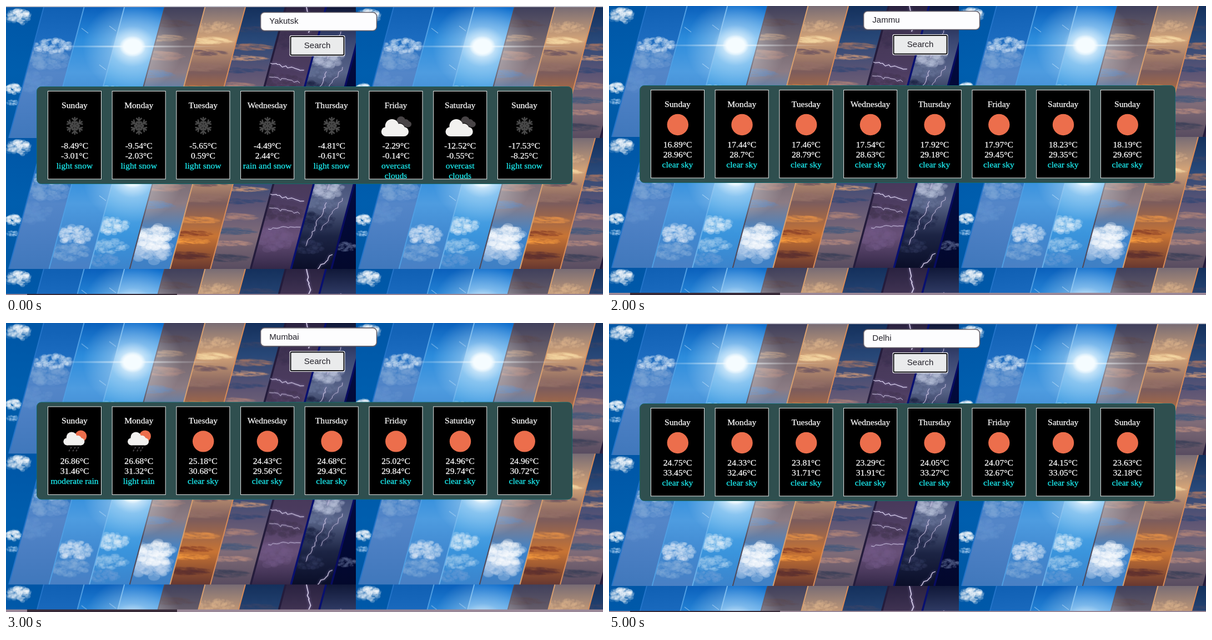
Write an HTML page with a canvas that moves like this. It is 1075 px wide and 521 px high and loops after 6 s.

```html
<!DOCTYPE html>
<html lang="en">
<head>
<meta charset="utf-8">
<title>Weather forecast</title>
<style>
html, body { margin: 0; width: 100%; height: 100%; overflow: hidden; background: #9a8898; }
#stage { position: absolute; left: 0; top: 0; width: 1075px; height: 526px; }
#stage > * { position: absolute; left: 0; top: 0; }
text { font: 15.6px "Liberation Serif", Times, serif; text-anchor: middle; fill: #fff; stroke: #fff; stroke-width: .25px; }
.sky { fill: #1cf0f4; stroke: #1cf0f4; }
.ui { font: 15px "Liberation Sans", Arial, sans-serif; text-anchor: start; fill: #222028; stroke: none; }
</style>
</head>
<body>
<div id="stage">
  <canvas id="back" width="1075" height="526"></canvas>
  <svg id="front" width="1075" height="526"></svg>
</div>
<script>
const W = 630, H = 236;
const days = 'Sunday Monday Tuesday Wednesday Thursday Friday Saturday Sunday'.split(' ');
const skies = {
  S: 'light snow', X: 'rain and snow', O: 'overcast/clouds', L: 'light rain', M: 'moderate rain',
  C: 'clear sky', B: 'broken clouds', F: 'few clouds', K: 'scattered/clouds'
};
// city, vertical scroll, sky codes, lows, highs
const cities = [
  ['Yakutsk', 0, 'SSSXSOOS', '-8.49 -9.54 -5.65 -4.49 -4.81 -2.29 -12.52 -17.53', '-3.01 -2.03 0.59 2.44 -0.61 -0.14 -0.55 -8.25'],
  ['Srinagar', 0, 'LCCCLCCC', '6.28 7.42 8.47 9.19 9.65 9.09 9.72 9.71', '16.87 19.66 20.52 20.99 20.14 20.75 20.99 21.05'],
  ['Jammu', -2, 'CCCCCCCC', '16.89 17.44 17.46 17.54 17.92 17.97 18.23 18.19', '28.96 28.7 28.79 28.63 29.18 29.45 29.35 29.69'],
  ['Mumbai', -2.6, 'MLCCCCCC', '26.86 26.68 25.18 24.43 24.68 25.02 24.96 24.96', '31.46 31.32 30.68 29.56 29.43 29.84 29.74 30.72'],
  ['Bengaluru', 0, 'LBFKKFLL', '18.78 18.12 17.16 16.62 15.68 16 16.69 17.62', '25.82 26.22 26 25.01 25.33 25.85 26.51 26.89'],
  ['Delhi', 0, 'CCCCCCCC', '24.75 24.33 23.81 23.29 24.05 24.07 24.15 23.63', '33.45 32.46 31.71 31.91 33.27 32.67 33.05 32.18']
];

let seed = 7;
const rnd = () => (seed = seed * 16807 % 2147483647) / 2147483647;
const edge = (k, y) => 68 + 72.6 * k - .267 * y;

// Each stripe: vertical gradient, then cloud patches "x y w h colour"
const stripes = [
  ['#0056a6 #005eae #0058a4', '22 18 42 26 #fff', '14 147 26 18 #fff', '38 152 18 14 #dcecfa', '12 172 22 10 #9cc4ea'],
  ['#1060b4 #1c6cc0 #5486c8 #4a7ec2 #4078bc', '72 92 88 40 #7ca4d4', '84 70 66 26 #e4eef8', '50 135 60 34 #6090cc'],
  ['#0a60bc #2c8cdc #4e9ce0 #4088d0 #4a80c4', '112 205 74 30 #84acd8', '124 174 60 32 #e0eaf6'],
  ['#0c6ccc #64b4f0 #52a8e8 #3a94dc #3c84cc', '186 194 62 26 #a8cdec', '192 158 54 30 #e0eef8', '172 220 60 22 #6c9cd4'],
  ['#40405c #70646c #8c7c84 #3c84cc #4080c4', '296 30 80 12 #5c4c54', '282 56 80 12 #b0907c', '276 88 80 16 #a8847c', '262 120 74 14 #6488b8', '262 198 70 52 #c0d4ec', '268 180 64 44 #fff'],
  ['#786c74 #d4a478 #7c5c5c #c87434 #683830', '376 36 78 20 #dcb48c', '364 60 76 12 #f4d8a4', '356 82 80 10 #6c5460', '346 108 84 14 #947068', '338 148 84 12 #e89448', '332 172 84 10 #843c28', '328 186 84 10 #fca040', '322 212 80 14 #5c3030'],
  ['#14305c #284878 #5c5474 #806c78 #584c60', '446 40 80 10 #384468', '438 72 80 12 #a47464', '430 92 76 9 #d49c78', '422 114 80 10 #344874', '408 142 84 12 #b08478', '404 168 84 12 #40587c', '398 190 84 10 #c09080', '390 216 84 14 #3c4058'],
  ['#2a2240 #463858 #4c3c60 #685078 #342848', '510 60 80 30 #3c3050', '494 136 80 30 #40344e', '482 182 66 40 #705884'],
  ['#101838 #384470 #586488 #1c2444 #0a0e28', '578 90 60 36 #b8c0d8', '566 118 60 20 #687498', '556 150 72 30 #1a2140', '540 196 62 24 #30385c'],
  ['#04104c #020a3c #03082c', '612 196 36 16 #5c6890']
];
const rims = '#2474c8 #509ee2 #68b0ea #504858 #d8a070 #d88c58 #241c3c #081070 #080c60'.split(' ');

function puff(c, [x, y, w, h, color]) {
  const flat = w > 4 * h;
  c.fillStyle = color;
  for (let i = 0; i < 110; i++) {
    const a = rnd() * 2 * Math.PI, d = Math.sqrt(rnd()) / 2, r = h * (.05 + .11 * rnd());
    c.globalAlpha = .1 + .22 * rnd();
    c.beginPath();
    c.ellipse(+x + w * d * Math.cos(a), +y + h * d * Math.sin(a), r * (flat ? 6 : 1.5), r, flat ? .1 : 0, 0, 7);
    c.fill();
  }
  c.globalAlpha = 1;
}

function bolt(c, x, y, toX, toY, width) {
  const n = Math.ceil(Math.hypot(toX - x, toY - y) / 5);
  c.beginPath();
  c.moveTo(x, y);
  for (let i = 1; i <= n; i++)
    c.lineTo(x + (toX - x) * i / n + (rnd() - .5) * 5, y + (toY - y) * i / n + (rnd() - .5) * 5);
  c.strokeStyle = '#d8d0ec';
  c.lineWidth = width;
  c.shadowColor = '#9080b8';
  c.shadowBlur = 4;
  c.stroke();
  c.shadowBlur = 0;
}

function makeTile() {
  const tile = document.createElement('canvas');
  tile.width = W;
  tile.height = H;
  const c = tile.getContext('2d');
  stripes.forEach(([colors, ...patches], k) => {
    const left = k ? edge(k - 1, 0) : -10, right = k < 9 ? edge(k, 0) : 720, lean = .267 * H;
    c.save();
    c.beginPath();
    c.moveTo(left, 0);
    c.lineTo(right, 0);
    c.lineTo(right - lean, H);
    c.lineTo(left - lean, H);
    c.clip();
    const g = c.createLinearGradient(0, 0, 0, H);
    colors.split(' ').forEach((s, i, all) => g.addColorStop(i / (all.length - 1), s));
    c.fillStyle = g;
    c.fillRect(0, 0, W, H);
    patches.forEach(p => puff(c, p.split(' ')));
    c.restore();
  });
  rims.forEach((color, k) => {
    c.strokeStyle = color;
    c.lineWidth = k > 5 ? 3.5 : 2;
    c.beginPath();
    c.moveTo(edge(k, 0), 0);
    c.lineTo(edge(k, H), H);
    c.stroke();
  });
  const glow = (rx, ry, stops) => {
    c.save();
    c.translate(228, 71);
    c.scale(rx, ry);
    const g = c.createRadialGradient(0, 0, 0, 0, 0, 1);
    stops.forEach(([at, a]) => g.addColorStop(at, `rgba(245,252,255,${a})`));
    c.fillStyle = g;
    c.fillRect(-1, -1, 2, 2);
    c.restore();
  };
  glow(90, 82, [[0, .95], [.2, .75], [.45, .32], [1, 0]]);
  glow(24, 19, [[0, 1], [.65, 1], [1, 0]]);
  glow(165, 2.5, [[0, .8], [.5, .3], [1, 0]]);
  c.strokeStyle = 'rgba(220,240,255,.45)';
  c.lineWidth = 1.2;
  c.beginPath();
  for (const [x, y] of [[136, 38], [186, 34], [168, 104]]) {
    c.moveTo(x, y);
    c.lineTo(x + 12, y + 9);
  }
  c.stroke();
  bolt(c, 476, 101, 536, 114, 1.2);
  bolt(c, 474, 126, 528, 136, .9);
  bolt(c, 472, 164, 528, 160, .9);
  bolt(c, 541, 0, 547, 44, 1.7);
  bolt(c, 603, 44, 580, 92, .9);
  bolt(c, 577, 116, 540, 196, 1);
  bolt(c, 606, 108, 566, 168, .8);
  bolt(c, 588, 210, 562, 235, 1.3);
  return tile;
}

function paintBack() {
  const c = document.getElementById('back').getContext('2d');
  const tile = makeTile();
  for (let y = 2; y < 526; y += H)
    for (let x = 0; x < 1075; x += W) c.drawImage(tile, x, y);
  c.fillStyle = '#d6dbe2';
  c.fillRect(0, 0, 1075, 1.5);
  c.fillStyle = '#9a8898';
  c.fillRect(0, 519, 1075, 7);
  c.fillStyle = '#382a38';
  c.fillRect(38, 519, 270, 7);
}

const disc = (x, y, r, fill) => `<circle cx="${x}" cy="${y}" r="${r}" fill="${fill}"/>`;
const box = (x, y, w, h, r, fill, stroke = 'none', sw = 1) =>
  `<rect x="${x}" y="${y}" width="${w}" height="${h}" rx="${r}" fill="${fill}" stroke="${stroke}" stroke-width="${sw}"/>`;
const label = (x, y, s, cls = '') => `<text x="${x}" y="${y}" class="${cls}">${s}</text>`;

function cloud(x, y, size, fill = '#f2f1ef') {
  return `<g transform="translate(${x} ${y}) scale(${size})">` + disc(8, 21, 8, fill) + disc(18, 11.5, 11.5, fill) +
    disc(31, 16, 8.5, fill) + disc(38, 21, 8, fill) + box(8, 14, 30, 15, 0, fill) + '</g>';
}

function flake() {
  let s = '';
  for (let a = 0; a < 360; a += 60)
    s += `<path transform="rotate(${a})" d="M0 0V-16M-5-14L0-9L5-14M-4-8L0-4L4-8"/>`;
  return `<g fill="none" stroke="#484848" stroke-width="2.6">${s}</g>`;
}

const orange = '#ec6e4c';
const shower = disc(11, -9.5, 10.5, orange) + cloud(-20.5, -17, .83) +
  '<path d="M-6 10l-1.5 3M1 10l-1.5 3M7 10l-1.5 3M-9 15l-1.5 3M-2 15l-1.5 3M4 15l-1.5 3" stroke="#4c484c" stroke-width="2"/>';
const overcast = cloud(-3, -17, .67, '#484446') + cloud(-27.5, -13.5, 1.09, '#000') + cloud(-26.5, -12, 1.07);
const icons = {
  S: flake(), X: flake(), L: shower, M: shower, O: overcast, B: overcast,
  C: disc(0, 0, 19.2, orange),
  F: disc(13, -4, 13.5, orange) + cloud(-25.5, -12, 1.07),
  K: cloud(-23, -14, 1)
};

function forecast([city, , codes, lows, highs]) {
  lows = lows.split(' ');
  highs = highs.split(' ');
  let s = box(458.5, 11.5, 209, 33, 7, '#fdfdfe', '#66606a', 1.6) + label(474.3, 32.3, city, 'ui') +
    box(510.5, 53, 100, 37.5, 3, '#fff') + box(512.5, 55, 96, 33.5, 2, '#eaebec', '#101014', 2) +
    label(536.8, 76.4, 'Search', 'ui') + box(55.5, 145.5, 964, 175, 8, '#2f4f4f', '#14686c');
  days.forEach((day, i) => {
    const x = 123.5 + 115.7 * i;
    s += box(x - 48, 153.5, 96, 158.5, 0, '#000', '#e8e8e8') + label(x, 184, day) +
      `<g transform="translate(${x + .3} 216)">${icons[codes[i]]}</g>` +
      label(x, 256.7, lows[i] + '°C') + label(x, 274.7, highs[i] + '°C');
    skies[codes[i]].split('/').forEach((line, n) => s += label(x, 292.7 + 18 * n, line, 'sky'));
  });
  return s;
}

const stage = document.getElementById('stage'), front = document.getElementById('front');
let shown = -1;
function tick() {
  const now = Math.floor(performance.now() / 1000) % cities.length;
  if (now !== shown) {
    shown = now;
    front.innerHTML = forecast(cities[now]);
    stage.style.transform = `translateY(${cities[now][1]}px)`;
  }
  requestAnimationFrame(tick);
}
paintBack();
tick();
</script>
</body>
</html>
```
